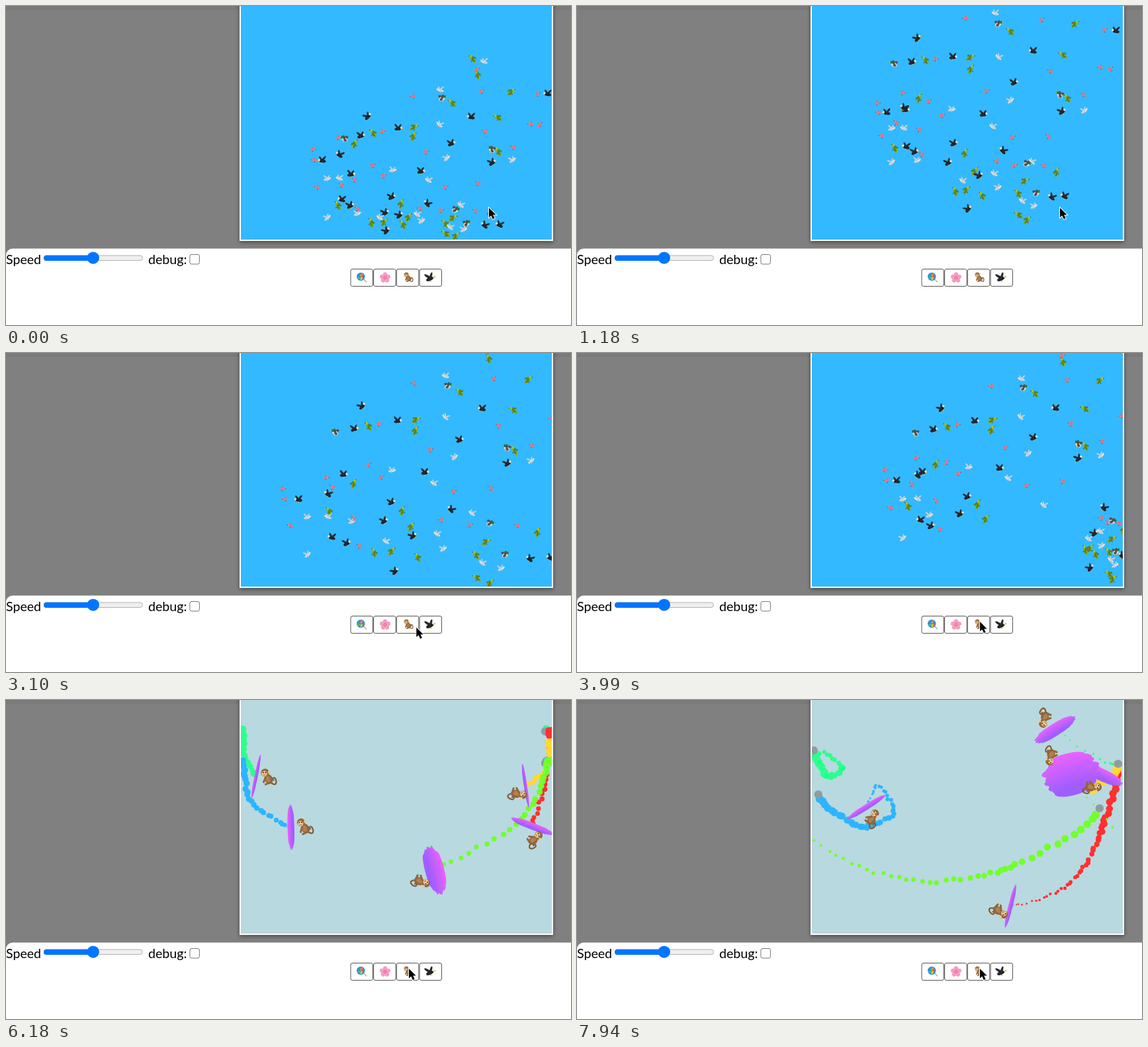
An HTML page with a canvas that plays this animation: 854 px wide and 482 px high, repeating every 8000 ms.

```html
<!DOCTYPE html>
<html lang="en">
<head>
<meta charset="utf-8">
<title>Flock and monkeys</title>
<style>
  html, body { margin: 0; width: 100%; height: 100%; overflow: hidden; background: #fff; }
  canvas { position: absolute; left: 0; top: 0; }
  span { position: absolute; top: 371px; font: 19.6px/24px Lato, "Open Sans", sans-serif; color: #000; }
</style>
</head>
<body>
<canvas id="stage" width="854" height="482"></canvas>
<span style="left:0">Speed</span>
<span style="left:215px">debug:</span>
<script>
const ctx = document.getElementById('stage').getContext('2d');
const LOOP = 8000, STEP = 147, BEAD = 49, TRAIL = 2450;
const FLOCK_TIMES = [0, 1176, 2352, 3969];
const MONKEYS_AT = 4557, POSE_TIMES = [5010, 6180, 7940];
const LEFT = 355, WIDTH = 470, FLOOR = 353;
const RAD = Math.PI / 180;

const lerp = (a, b, u) => a + (b - a) * u;
const mix = (a, b, u) => a.map((v, i) => lerp(v, b[i], u));
const clamp = u => Math.max(0, Math.min(1, u));
const random = n => { const v = Math.sin(n * 12.9898) * 43758.5453; return v - Math.floor(v); };

function blob(color, x, y, rx, ry = rx, angle = 0) {
  ctx.fillStyle = color;
  ctx.beginPath();
  ctx.ellipse(x, y, rx, ry, angle, 0, 7);
  ctx.fill();
}

function line(color, width, path) {
  ctx.strokeStyle = color;
  ctx.lineWidth = width;
  ctx.lineCap = 'round';
  ctx.stroke(new Path2D(path));
}

function box(x, y, w, h, r, fill, stroke) {
  ctx.beginPath();
  ctx.roundRect(x, y, w, h, r);
  ctx.fillStyle = fill;
  ctx.fill();
  if (stroke) { ctx.strokeStyle = stroke; ctx.lineWidth = 1; ctx.stroke(); }
}

function place(x, y, angle, sx, sy, draw) {
  ctx.save();
  ctx.translate(x, y);
  ctx.rotate(angle);
  ctx.scale(sx, sy);
  draw();
  ctx.restore();
}

const kinds = [
  { body: '#dedcd9', wing: '#574c4a', head: '#1a7a45', beak: '#e3b93a', length: 5, girth: 3.2, span: 3.4 },
  { body: '#1c1c20', wing: '#29292d', head: '#e8e8e4', beak: '#e2ae2d', length: 5.2, girth: 2.3, span: 4.6 },
  { body: '#dcdfe0', wing: '#c6ced2', head: '#eeeeee', beak: '#c9a78f', length: 4.8, girth: 1.8, span: 4 },
  { body: '#86ac1c', wing: '#587f20', head: '#b4c722', beak: '#45551c', length: 6.8, girth: 2.5, span: 2.4, steep: -.45 },
  { body: '#f2777c', wing: '#ef6870', head: '#f58c8e', beak: '#8a4a52', length: 3.6, girth: 1.3, span: 2 }
];
const eagle = kinds[1];

function drawBird({ body, wing, head, beak, length, girth, span }) {
  blob(wing, -span * .8, -2, span, girth * .65, .55);
  blob(body, -.5, 1, length, girth, -.45);
  blob(wing, .5, -span * .6, span, girth * .6, -1.25);
  blob(wing, -1.5, 2, length * .5, girth * .6, -.4);
  blob(head, length * .75, -2, girth * .5 + .5);
  blob(beak, length * .75 + girth * .5 + .5, -1.5, 1, .7);
  blob(beak, .5, girth + 1.8, .8);
}

function drawMonkey() {
  const fur = '#93663b', skin = '#ecc896', dark = '#3b2417';
  line('#855a32', 2.2, 'M5 9Q13 15 13 7Q12 0 8 2Q7 4 9 5');
  blob(fur, 1.5, 3.5, 6, 7.6, -.5);
  blob('#b08150', 0, 3, 3.6, 5.6, -.5);
  line(fur, 3, 'M-3 1L-6 8M4 9L-3 11.5');
  blob(fur, -4, -6, 6.2);
  blob(skin, 2, -7, 2);
  blob(skin, -5, -4.6, 4.2);
  line(dark, 1.9, 'M-6.7 -6.4h.1M-3 -6.4h.1');
  line('#9a6848', 1, 'M-6.5 -2.6h3');
}

// Each swarm is an ellipse (x, y, rx, ry) that drifts and swells from one time to the next.
const swarms = [
  { size: 50, slant: -.5, keys: [[655,205,185,105], [640,110,195,140], [660,130,220,135], [670,125,205,115]] },
  { size: 23, slant: 0, keys: [[650,325,100,28], [655,275,85,60], [600,300,225,65], [800,292,32,62]] },
  { size: 14, slant: 0, keys: [[500,255,45,75], [490,180,45,65], [455,265,95,70], [510,215,55,75]] }
];

const birds = swarms.flatMap((swarm, s) => Array.from({ length: swarm.size }, (_, i) => {
  const seed = s * 100 + i + 1;
  const radius = Math.sqrt((i + random(seed)) / swarm.size), turn = i * 2.4 + random(seed + 40);
  const kind = kinds[Math.floor(random(seed + 300) * kinds.length)];
  return {
    swarm, kind,
    dx: radius * Math.cos(turn), dy: radius * Math.sin(turn),
    tilt: .8 * (random(seed + 500) - .5) + (kind.steep || 0),
    flip: random(seed + 700) < .5 ? -1 : 1
  };
}));

function drawFlock(t) {
  const k = t < FLOCK_TIMES[1] ? 0 : t < FLOCK_TIMES[2] ? 1 : 2;
  const u = (t - FLOCK_TIMES[k]) / (FLOCK_TIMES[k + 1] - FLOCK_TIMES[k]);
  const rise = 45 * Math.max(0, u - 1);
  for (const { swarm, kind, dx, dy, tilt, flip } of birds) {
    const [x, y, rx, ry] = mix(swarm.keys[k], swarm.keys[k + 1], clamp(u));
    const c = Math.cos(swarm.slant), s = Math.sin(swarm.slant);
    place(x + rx * dx * c - ry * dy * s, y + rx * dx * s + ry * dy * c - rise,
      tilt * flip, flip, 1, () => drawBird(kind));
  }
}

// The paths meet at the middle pose; a pose is disc angle, half width and bearing of the monkey.
const swingers = [
  { color: '#2dff8d', side: -1, first: [[358,46], [361,85], [378,116]],
    second: [[378,116], [401,104], [368,79], [335,96], [252,45]], poses: [[-2,1.5,60], [-79,2,0], [-32,9,-135]] },
  { color: '#2db5ff', side: -1, first: [[358,94], [372,155], [431,193]],
    second: [[431,193], [478,172], [455,130], [437,162]], poses: [[-2,6,66], [-92,5,-6], [-32,4,58]] },
  { color: '#ff3030', side: 1, first: [[822,48], [817,115], [795,191]],
    second: [[795,191], [768,250], [722,292], [655,312]], poses: [[2,8,60], [21,5,76], [-76,3,153]] },
  { color: '#ffd92f', side: 1, first: [[822,65], [817,105], [785,129]],
    second: [[785,129], [780,138], [791,112]], poses: [[5,2,74], [82,2,128], [25,9,119]] },
  { color: '#72ff2f', side: 1, first: [[820,93], [778,182], [647,257]],
    second: [[647,257], [520,274], [380,228], [276,112]], poses: [[10,12,75], [76,14,137], [-15,31,221]] }
];

function spline(points, u) {
  const last = points.length - 1;
  const i = Math.min(last - 1, Math.floor(u * last)), f = u * last - i;
  return [0, 1].map(axis => {
    const [a, b, c, d] = [-1, 0, 1, 2].map(n => points[Math.max(0, Math.min(last, i + n))][axis]);
    return b + f * (c - a + f * (2 * a - 5 * b + 4 * c - d + f * (3 * (b - c) + d - a))) / 2;
  });
}

function pathAt({ first, second, side }, t) {
  const [t0, t1, t2] = POSE_TIMES;
  if (t < t0) return [first[0][0] + side * 14 * (t0 - t) / (t0 - MONKEYS_AT), first[0][1]];
  return t < t1 ? spline(first, (t - t0) / (t1 - t0)) : spline(second, clamp((t - t1) / (t2 - t1)));
}

const wrap = x => x < LEFT - 8 ? x + WIDTH : x;

function drawTrail(swinger, t) {
  const from = Math.ceil(Math.max(MONKEYS_AT, t - TRAIL) / BEAD), to = Math.floor(t / BEAD);
  const tip = lerp(3.2, 1, clamp((t - POSE_TIMES[1]) / (POSE_TIMES[2] - POSE_TIMES[1])));
  for (let i = to; i >= from; i--) {
    const [x, y] = pathAt(swinger, i * BEAD);
    blob(i === from ? '#8f9da2' : swinger.color,
      wrap(x) + 4 * (random(i) - .5), y + 4 * (random(i + 50) - .5),
      lerp(6.2, tip, (i - from) / Math.max(1, to - from)));
  }
}

function drawDisc(x, y, angle, half) {
  const slices = 11, length = 33 + .3 * half;
  place(x, y, angle, 1, 1, () => {
    for (let i = 0; i < slices; i++) {
      const u = i / (slices - 1), o = u * 2 - 1;
      const ragged = (2 + half * .2) * (random(i + 9) - .5);
      blob(`rgb(${lerp(232, 160, u)},${lerp(98, 94, u)},255)`,
        ragged, o * half * .75, length * (1 - .3 * o * o), Math.max(1, half * .28));
    }
  });
}

function drawSwingers(t) {
  const k = t < POSE_TIMES[1] ? 0 : 1;
  const u = clamp((t - POSE_TIMES[k]) / (POSE_TIMES[k + 1] - POSE_TIMES[k]));
  const spin = 8 * Math.sin(Math.PI * u) ** 2;
  for (const s of swingers) drawTrail(s, t);
  const monkeys = swingers.map(s => {
    const [angle, half, bearing] = mix(s.poses[k], s.poses[k + 1], u);
    const [px, y] = pathAt(s, t), x = wrap(px), reach = 16 + .8 * half;
    drawDisc(x, y, angle * RAD, half + spin);
    return [x + reach * Math.cos(bearing * RAD), y + reach * Math.sin(bearing * RAD), bearing * RAD];
  });
  for (const [x, y, angle] of monkeys) place(x, y, angle, 1, 1, drawMonkey);
}

function drawPointer(t) {
  const swoop = clamp((t - 1400) / 950), settle = 1 - (1 - clamp((t - 2352) / 1700)) ** 2;
  const x = lerp(730, 644, swoop) - 35 * settle;
  const y = lerp(305, 433, swoop) + 65 * Math.sin(Math.PI * swoop) - 27 * settle;
  place(x, y, 0, 1, 1, () => {
    const arrow = new Path2D('M0 0V14.5L3.3 11.6L5.8 17L8.6 15.8L6.2 10.6H10.6Z');
    ctx.strokeStyle = '#fff';
    ctx.lineWidth = 2;
    ctx.stroke(arrow);
    ctx.fillStyle = '#000';
    ctx.fill(arrow);
  });
}

function drawLollipop() {
  line('#b9b2a8', 1.6, 'M539 411L544.5 417');
  blob('#2a95dc', 536.3, 409, 6.2);
  ['#f04a4a', '#f9c62f', '#62c04a', '#2a95dc', '#f58b2c'].forEach((color, i, all) => {
    const a = i / all.length * 2 * Math.PI;
    blob(color, 536.3 + 2.7 * Math.cos(a), 409 + 2.7 * Math.sin(a), 2.7, 1.5, a + .6);
  });
}

function drawFlower() {
  for (let i = 0; i < 5; i++) {
    const a = i * Math.PI * .4 - Math.PI / 2;
    blob('#f79ac6', 573 + 4.4 * Math.cos(a), 410.5 + 4.4 * Math.sin(a), 3.9, 3.3, a);
  }
  blob('#e2609a', 573, 410.5, 2.3);
  blob('#f6d455', 573, 410.5, 1.1);
}

function drawPanel() {
  box(0, 366.5, 900, 140, [10, 0, 0, 0], '#fff');
  box(57.5, 377, 149, 7.5, 4, '#efefef', '#b2b2b2');
  box(57, 376.7, 75, 8.3, 4, '#0075ff');
  blob('#0075ff', 131.7, 380.6, 9.2);
  box(277.9, 375.5, 14.5, 14.5, 2.5, '#fff', '#767676');
  for (let i = 0; i < 4; i++) box(521 + i * 34.7, 397.5, 33.4, 26, 2.5, '#fff', '#555');
  drawLollipop();
  drawFlower();
  place(607.5, 409.5, 0, .58, .58, drawMonkey);
  place(641.5, 411, 0, 1.2, 1.2, () => drawBird(eagle));
}

function drawPage(monkeys) {
  ctx.fillStyle = '#808080';
  ctx.fillRect(0, 0, 854, 482);
  ctx.fillStyle = '#7a7a7a';
  ctx.fillRect(0, 0, 854, 6);
  ctx.save();
  ctx.shadowColor = 'rgba(0,0,0,.45)';
  ctx.shadowBlur = 6;
  ctx.shadowOffsetY = 2;
  ctx.fillStyle = '#fff';
  ctx.fillRect(LEFT - 2, -20, WIDTH + 4, FLOOR + 22);
  ctx.restore();
  ctx.fillStyle = monkeys ? '#b8d9e0' : '#33b9ff';
  ctx.fillRect(LEFT, 0, WIDTH, FLOOR);
}

function draw(time) {
  const t = Math.floor(time / STEP) * STEP, monkeys = t >= MONKEYS_AT;
  drawPage(monkeys);
  ctx.save();
  ctx.beginPath();
  ctx.rect(LEFT, 0, WIDTH, FLOOR);
  ctx.clip();
  (monkeys ? drawSwingers : drawFlock)(t);
  ctx.restore();
  drawPanel();
  drawPointer(t);
}

const begin = performance.now();
function tick() {
  draw((performance.now() - begin) % LOOP);
  requestAnimationFrame(tick);
}
tick();
</script>
</body>
</html>
```
